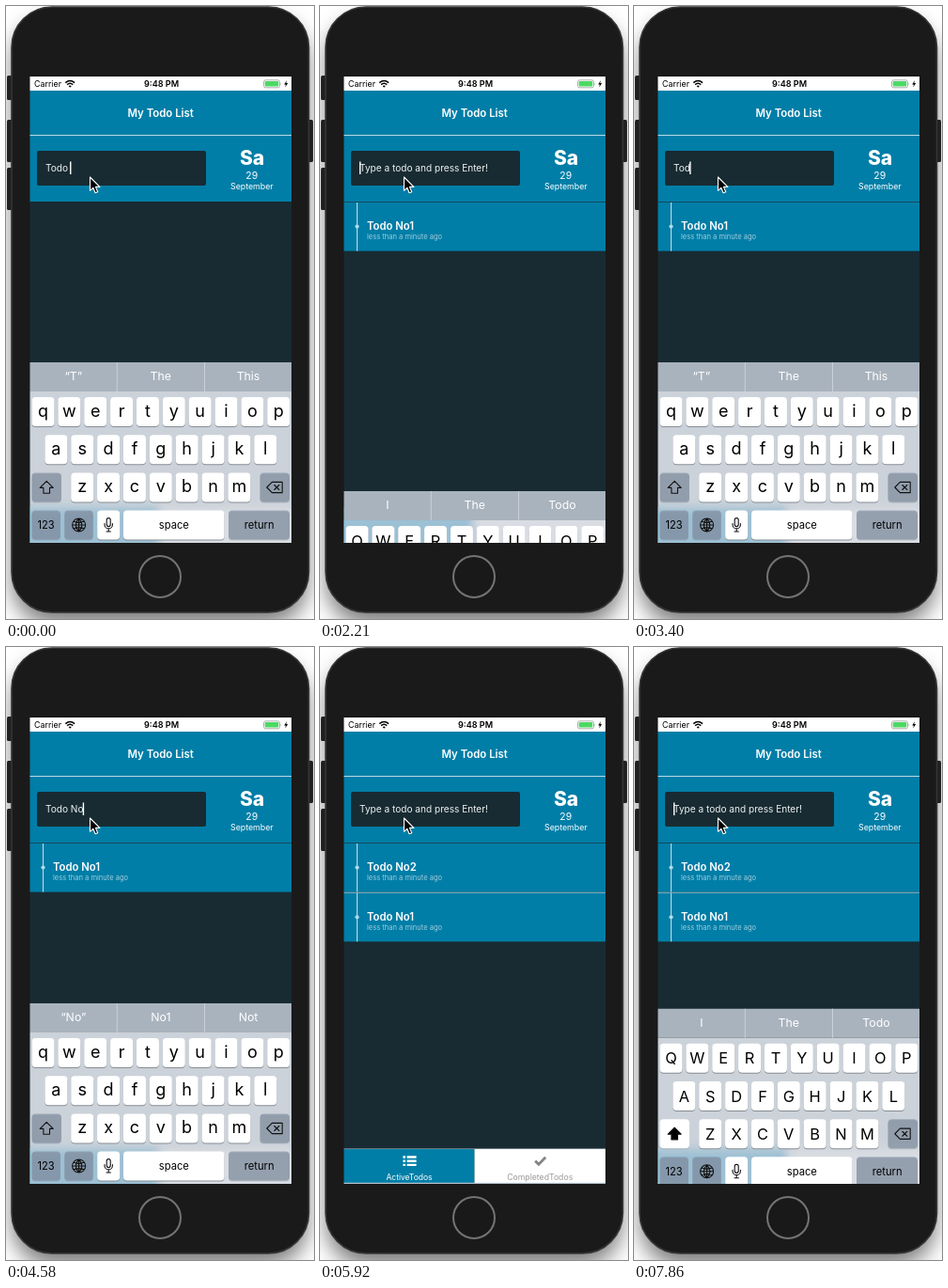
An HTML page for the animation above (8 s loop, 328 by 652 pixels).

```html
<!DOCTYPE html>
<html lang="en">
<head>
<meta charset="utf-8">
<title>Todo list</title>
<style>
  html, body { margin: 0; width: 100%; height: 100%; overflow: hidden; background: #fff; }
  svg { display: block; width: 328px; height: 652px; }
  text { font-family: Inter, Roboto, sans-serif; white-space: pre; }
  .mid { text-anchor: middle; }
  .white { fill: #fff; }
  .bold { font-weight: 600; }
  .line { fill: none; stroke: #111; stroke-width: 1.1; stroke-linecap: round; stroke-linejoin: round; }
</style>
</head>
<body>
<svg viewBox="0 0 328 652">
  <defs>
    <clipPath id="screen"><rect x="25.5" y="75" width="278.5" height="496"/></clipPath>
    <clipPath id="behind"><rect id="behindRect" x="25" y="410" width="280" height="200"/></clipPath>
    <filter id="shadow" x="-20%" y="-20%" width="140%" height="140%"><feGaussianBlur stdDeviation="11"/></filter>
    <filter id="blur" x="-30%" y="-60%" width="160%" height="220%"><feGaussianBlur stdDeviation="5"/></filter>
  </defs>

  <!-- phone -->
  <rect width="328" height="652" fill="#fff"/>
  <rect x="6" y="14" width="316" height="645" rx="45" opacity=".5" filter="url(#shadow)"/>
  <g fill="#202020">
    <rect x="1" y="74" width="7" height="26" rx="1.5"/>
    <rect x="1" y="121" width="7" height="45" rx="1.5"/>
    <rect x="1" y="172" width="7" height="45" rx="1.5"/>
    <rect x="320" y="121" width="7" height="45" rx="1.5"/>
  </g>
  <rect x="6" y="1" width="316.5" height="644" rx="43" fill="#1a1a1a" stroke="#363636" stroke-width="1.6"/>
  <circle cx="164" cy="607" r="22" fill="#191919" stroke="#747474" stroke-width="2"/>

  <g clip-path="url(#screen)">
    <rect x="25" y="75" width="280" height="496" fill="#182b32"/>

    <!-- status bar -->
    <rect x="25" y="75" width="280" height="15" fill="#fff"/>
    <text x="30" y="86" font-size="8.9">Carrier</text>
    <g fill="none" stroke="#000" stroke-width="1.5">
      <path d="M63.3 81.6Q68.2 77.4 73.1 81.6M65.1 83.6Q68.2 81 71.3 83.6"/>
    </g>
    <path d="M66.6 85.1Q68.2 83.8 69.8 85.1L68.2 86.8Z"/>
    <text class="mid bold" x="165.5" y="86" font-size="9.1">9:48 PM</text>
    <rect x="274.5" y="78.8" width="17" height="8" rx="2" fill="#fff" stroke="#8d8d8d" stroke-width=".7"/>
    <rect x="275.7" y="80" width="14.6" height="5.6" rx="1" fill="#4cd964"/>
    <path d="M292.6 81.4q1.4 1.4 0 2.8z" fill="#8d8d8d"/>
    <path d="M299 79L296.2 83.4H298L297.2 86.6L300.2 82.1H298.3Z"/>

    <!-- header -->
    <rect x="25" y="90" width="280" height="118" fill="#007ea7"/>
    <text class="mid white bold" x="164.7" y="117.6" font-size="11.4">My Todo List</text>
    <rect x="25" y="137" width="280" height="1" fill="#b9dbe6"/>
    <rect x="33" y="154" width="180" height="37" rx="2" fill="#182b32"/>
    <text id="input" x="42" y="176" font-size="10.1" fill="#eef2f3"></text>
    <rect id="caret" y="165.5" width="1.4" height="13.5" fill="#fff"/>
    <g class="white">
      <text class="mid" x="262" y="168.8" font-size="21" font-weight="800">Sa</text>
      <text class="mid" x="261.7" y="184" font-size="10.4">29</text>
      <text class="mid" x="261.8" y="195" font-size="8.8">September</text>
    </g>

    <g id="list"></g>

    <!-- tabs -->
    <rect x="25" y="534" width="139.5" height="36" fill="#007ea7"/>
    <rect x="164.5" y="534" width="140" height="36" fill="#fff"/>
    <rect x="25" y="533.5" width="280" height=".6" fill="#aebcc2"/>
    <rect x="25" y="569.8" width="280" height="1.2" fill="#b4c3ca"/>
    <path d="M88.4 542.5h2.6M88.4 546.7h2.6M88.4 550.9h2.6M92.6 542.5h10M92.6 546.7h10M92.6 550.9h10" stroke="#fff" stroke-width="2.4"/>
    <text class="mid white" x="95" y="567" font-size="8.5">ActiveTodos</text>
    <path d="M229.2 546.6L232.9 550.2L240.2 542.8" fill="none" stroke="#858585" stroke-width="2.9"/>
    <text class="mid" x="234.2" y="567" font-size="8.7" fill="#999">CompletedTodos</text>

    <!-- keyboard -->
    <g id="base">
      <rect x="25" y="410" width="280" height="170" fill="#ccd2d9"/>
      <g id="bar">
        <rect x="25" y="379" width="280" height="31" fill="#a9b3be"/>
        <path d="M118.3 379v31M211.5 379v31" stroke="#c9d0d7"/>
      </g>
    </g>
    <g clip-path="url(#behind)">
      <g filter="url(#blur)">
        <rect x="15" y="534" width="149.5" height="50" fill="#2f97c6" opacity=".3"/>
        <rect x="164.5" y="534" width="150" height="50" fill="#fff" opacity=".25"/>
      </g>
    </g>
    <g id="keys"></g>
  </g>

  <!-- pointer -->
  <path d="M89.5 182V196.3L92.8 193.3L95.1 198.8L97.7 197.7L95.4 192.4H99.9Z" fill="#000" stroke="#fff" stroke-width="1.1" stroke-linejoin="round"/>
</svg>

<script>
const LOOP = 8000;
const $ = id => document.getElementById(id);

function add(parent, tag, attrs, text) {
  const node = document.createElementNS("http://www.w3.org/2000/svg", tag);
  for (const name in attrs) node.setAttribute(name, attrs[name]);
  if (text !== undefined) node.textContent = text;
  return parent.appendChild(node);
}

// Todo rows
const rows = [0, 1].map(i => {
  const row = add($("list"), "g", { transform: `translate(0 ${i * 52.7})` });
  add(row, "rect", { x: 25, y: 208.6, width: 280, height: 52, fill: "#007ea7" });
  add(row, "rect", { x: 25, y: 208, width: 280, height: 1, fill: i ? "#9cc5d3" : "#164a5c" });
  add(row, "rect", { x: 39, y: 209, width: 1, height: 51.6, fill: "#c3e0ea" });
  add(row, "circle", { cx: 39.5, cy: 234.6, r: 2.1, fill: "#b4dbe8" });
  const title = add(row, "text", { x: 50, y: 238, "font-size": 11.3, class: "white bold" });
  add(row, "text", { x: 50, y: 248, "font-size": 7.55, fill: "#9fcbdb" }, "less than a minute ago");
  return { row, title };
});

// Keyboard
const keys = $("keys");
const letters = [];
const pitch = 27.86;

function key(x, y, w, special) {
  add(keys, "rect", { x, y: y + 1, width: w, height: 31, rx: 4, fill: "#7f858d", opacity: special ? .35 : .9 });
  return add(keys, "rect", {
    x, y, width: w, height: 31, rx: 4,
    fill: special ? "#7d8da0" : "#fff", "fill-opacity": special ? .6 : 1
  });
}

["qwertyuiop", "asdfghjkl", "zxcvbnm"].forEach((chars, r) => {
  const first = [39.5, 53.4, 81.2][r];
  [...chars].forEach((char, i) => {
    const x = first + i * pitch, y = 416 + r * 40.2;
    key(x - 12, y, 24);
    letters.push({ char, y, node: add(keys, "text", { x, class: "mid" }) });
  });
});

const shiftKey = key(27.5, 496.4, 31.5, true);
const shiftIcon = add(keys, "path", { class: "line", d: "M43.2 505.3L50.2 512.4H46.5V518.3H39.9V512.4H36.2Z" });
key(270.5, 496.4, 31.5, true);
add(keys, "path", { class: "line", d: "M277.8 512L283.3 506.4H294.2V517.6H283.3ZM285.8 509.5l5 5M290.8 509.5l-5 5" });

key(27.5, 536.6, 30.5, true);
key(62.3, 536.6, 30.5, true);
key(97.2, 536.6, 24);
key(125, 536.6, 107.5);
key(237, 536.6, 65, true);
[["123", 42.6], ["space", 178.8], ["return", 269.6]].forEach(([label, x]) =>
  add(keys, "text", { x, y: 556, "font-size": 11.2, class: "mid" }, label));
add(keys, "path", { class: "line", "stroke-width": .9,
  d: "M70.6 552a7 7 0 1 0 14 0a7 7 0 1 0-14 0H84.6M77.6 545V559M77.6 545q-6.6 7 0 14q6.6-7 0-14M72.2 548.3q5.4 2.2 10.8 0M72.2 555.7q5.4-2.2 10.8 0" });
add(keys, "rect", { x: 107.2, y: 544.6, width: 4, height: 9, rx: 2, class: "line" });
add(keys, "path", { class: "line", d: "M105 550.5v1.2a4.2 4.2 0 0 0 8.4 0v-1.2M109.2 556v3M107 559h4.4" });

const hints = [71.8, 164.8, 258].map(x =>
  add(keys, "text", { x, y: 398, "font-size": 12.3, class: "mid white" }));

// Held states: time, typed text (null = not focused), suggestions
const T = "“T”|The|This", EMPTY = "I|The|Todo", NO = "“No”|No1|Not", TODO = "“Todo”|The|Today";
const states = [
  [0, "Todo ", T], [140, "Todo ", EMPTY], [290, "Todo N", EMPTY], [440, "Todo No", EMPTY],
  [590, "Todo No", NO], [740, "Todo No1", NO], [1030, "Todo No1", "“No1”||"],
  [1180, null], [1330, null], [1480, null], [1630, null], [1770, null],
  [2210, "", EMPTY], [2360, "", EMPTY], [2510, "", EMPTY], [2660, "", EMPTY],
  [2810, "T", EMPTY], [2960, "T", T], [3110, "To", T], [3260, "Tod", T], [3410, "Todo", T],
  [3700, "Todo", TODO], [3990, "Todo ", TODO], [4140, "Todo ", EMPTY],
  [4430, "Todo N", EMPTY], [4580, "Todo No", NO], [4880, "Todo No2", NO], [5030, "Todo No2", "“No2”||"],
  [5320, null], [5470, null], [5620, null], [5770, null], [5920, null],
  [7570, "", EMPTY], [7720, "", EMPTY], [7860, "", EMPTY]
];

// Keyboard moves: start time, 1 = rising, 0 = falling
const moves = [[1232, 0], [2153, 1], [5349, 0], [7572, 1]];

function keyboardOffset(t) {
  const move = moves.filter(m => m[0] <= t).pop();
  if (!move) return 0;
  const u = (t - move[0]) * .0186;
  const left = (1 + u) * Math.exp(-u);
  return move[1] ? 192 * left : 161 * (1 - left);
}

function render(time) {
  const [t, typed, hintText = "||"] = states.filter(s => s[0] <= time).pop();
  const focused = typed !== null;
  const upper = typed === "";

  const input = $("input"), caret = $("caret");
  input.textContent = typed || "Type a todo and press Enter!";
  caret.setAttribute("x", 42 + (typed ? input.getComputedTextLength() - .8 : 0));
  caret.style.display = focused ? "" : "none";

  const count = t >= 5320 ? 2 : t >= 1180 ? 1 : 0;
  rows.forEach(({ row, title }, i) => {
    row.style.display = i < count ? "" : "none";
    title.textContent = "Todo No" + (count - i);
  });

  const offset = keyboardOffset(t);
  const shift = `translate(0 ${offset.toFixed(2)})`;
  $("base").setAttribute("transform", shift);
  keys.setAttribute("transform", shift);
  $("behindRect").setAttribute("y", 410 + offset);
  $("bar").style.display = focused ? "" : "none";
  hintText.split("|").forEach((word, i) => hints[i].textContent = word);

  letters.forEach(({ char, y, node }) => {
    node.textContent = upper ? char.toUpperCase() : char;
    node.setAttribute("font-size", upper ? 16.4 : 18);
    node.setAttribute("y", y + (upper ? 21.6 : 20.6));
  });
  shiftKey.setAttribute("fill", upper ? "#fff" : "#7d8da0");
  shiftKey.setAttribute("fill-opacity", upper ? 1 : .6);
  shiftIcon.style.fill = upper ? "#000" : "none";
}

const start = performance.now();
function frame() {
  render((performance.now() - start) % LOOP);
  requestAnimationFrame(frame);
}
frame();
</script>
</body>
</html>
```
